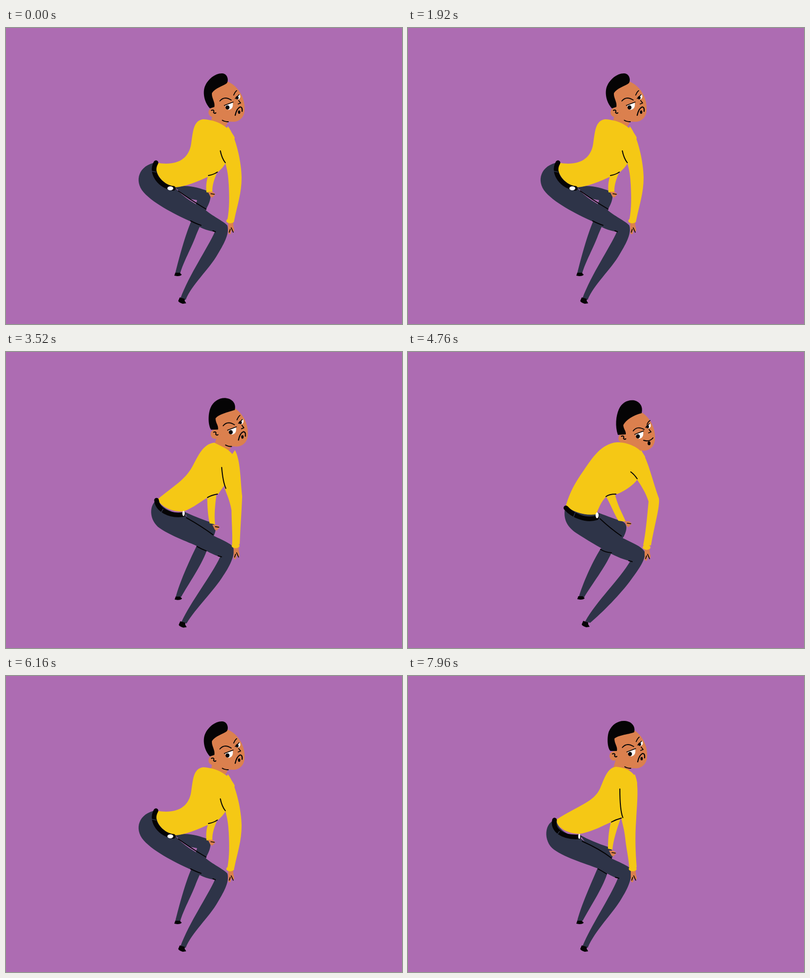
Recreate the animation shown at these times as an HTML page with a canvas. Size 800 px wide and 600 px high, loop 8000 ms.

```html
<!DOCTYPE html>
<html lang="en">
<head>
<meta charset="utf-8">
<title>Dance</title>
<style>
html, body { margin: 0; width: 100%; height: 100%; overflow: hidden; background: #ad6cb2; }
canvas { display: block; }
</style>
</head>
<body>
<canvas id="stage" width="800" height="600"></canvas>
<script>
const ctx = document.getElementById('stage').getContext('2d');
const NAVY = '#2e3448', YELLOW = '#f5c815', SKIN = '#db804e', BLACK = '#050405', WHITE = '#fff';

// Key poses share path commands, so their numbers can be blended.
const hipsBack = {
  hair: 'M412 163C400 150 397 130 402 118C408 103 424 91 437 92C449 93 450 108 446 112C438 118 422 122 416 132C415 142 423 150 421 160Z',
  shirt: 'M398 185C378 188 378 210 374 235C369 268 342 280 304 273C299 295 316 317 341 323C370 321 400 305 427 293C433 288 440 281 444 273C455 255 460 235 462 222C452 200 425 186 398 185Z',
  arm: 'M448 199C465 220 476 275 476 303C476 335 467 360 461 390L447 390C452 365 451 340 450 318C449 295 446 285 443 273L436 235Z',
  farArm: 'M409 298C404 312 404 322 405 333L417 335C416 320 420 308 426 294Z',
  leg: 'M304 272C268 278 258 310 278 333C300 358 350 382 375 393C390 404 405 411 422 413C408 445 370 500 352 549L363 551C375 520 410 490 428 458C442 435 452 415 447 400C440 392 415 380 402 368C380 355 360 345 341 323C316 317 299 295 304 272Z',
  farLeg: 'M341 323C365 316 390 324 406 330C418 334 413 352 405 366C400 385 390 405 384 420C375 445 358 475 352 497L342 497C350 465 362 420 374 392L386 349L370 346Z',
  belt: 'M303 273C290 295 313 322 338 325',
  loop: 'M293 290L303 292',
  seams: 'M433 249Q436 264 443 273M409 299Q420 297 427 292M348 330Q372 348 404 367M373 391Q385 397 394 400M418 411L423 413',
  face: '0 0', ear: '418 171', buckle: '332 325 6 4', hand: '454 407', farHand: '416 337', foot: '356 553', farFoot: '347 500'
};
const upright = {
  hair: 'M409 152C402 145 402 122 406 112C412 98 425 90 438 91C452 92 460 102 457 114C443 119 424 120 417 127C417 138 424 143 422 152Z',
  shirt: 'M420 184C402 186 396 210 388 228C376 255 345 262 300 291C299 305 320 320 347 320C375 315 400 300 411 296C418 292 425 290 431 288C445 260 460 235 463 218C462 198 445 186 420 184Z',
  arm: 'M458 199C467 218 463 255 461 290C458 330 460 360 462 388L447 390C446 370 441 350 439 330C437 310 433 300 431 288L428 240Z',
  farArm: 'M410 296C405 315 404 335 404 350L413 352C414 335 422 310 429 290Z',
  leg: 'M300 291C275 295 272 335 295 352C320 370 365 382 388 392C405 402 415 408 424 410C408 450 370 505 352 549L363 551C378 515 415 480 432 450C448 425 456 400 447 388C440 383 425 376 411 370C390 358 370 345 347 328C325 325 300 310 300 291Z',
  farLeg: 'M347 322C365 332 385 340 403 346C415 350 416 362 411 372C409 385 405 395 402 402C392 432 368 468 353 496L342 496C350 465 368 425 382 392L390 372L375 360Z',
  belt: 'M296 292C291 312 312 328 345 326',
  loop: 'M301 322L306 315',
  seams: 'M428 229Q428 272 434 287M411 296Q420 291 431 288M352 335Q388 351 411 369M384 391Q393 396 401 401M419 408L426 410',
  face: '1 -3', ear: '416 162', buckle: '346 325 2 5', hand: '455 407', farHand: '414 359', foot: '356 553', farFoot: '347 500'
};
const leaning = {
  hair: 'M424 168C418 150 420 130 426 116C432 102 445 96 457 98C470 101 475 112 472 124C455 128 440 138 435 148C435 156 441 160 440 167Z',
  shirt: 'M422 183C390 186 372 215 355 240C335 268 325 290 319 312C335 325 358 332 380 329C385 318 390 302 401 293C410 289 418 289 425 287C440 280 455 270 463 259C473 245 480 235 479 212C468 193 445 183 422 183Z',
  arm: 'M471 199C486 222 492 255 507 297C509 315 498 350 491 392L475 392C480 370 483 335 486 303C480 285 472 272 463 259L450 235Z',
  farArm: 'M400 293C410 310 415 325 425 342L440 344C432 325 423 310 418 288Z',
  leg: 'M318 312C313 335 318 352 340 367C360 380 385 395 405 406C420 415 440 422 449 424C428 460 380 506 358 546L368 549C392 529 432 488 451 461C467 440 482 417 478 405C472 392 440 382 425 372C405 357 395 345 380 328C358 332 335 325 318 312Z',
  farLeg: 'M380 324C395 330 415 337 428 342C444 345 444 358 436 374C428 385 420 395 411 407C398 437 372 470 356 497L345 497C353 470 370 430 389 399L405 385L390 350Z',
  belt: 'M319 316C333 332 360 343 381 336',
  loop: 'M334 335L338 325',
  seams: 'M450 243Q457 248 463 257M400 293Q406 288 420 288M388 338Q408 357 431 373M389 400Q398 406 411 407M446 423L453 425',
  face: '17 10', ear: '434 175', buckle: '382 331 3 6', hand: '483 412', farHand: '445 348', foot: '359 552', farFoot: '349 499'
};
const tucked = {
  hair: 'M440 180C432 165 434 145 440 130C447 115 462 111 474 112C488 114 494 125 488 135C475 146 458 148 450 156C448 165 456 172 454 178Z',
  shirt: 'M440 188C405 188 370 215 350 242C330 270 324 290 322 316C335 330 360 337 382 330C380 312 390 293 408 289C420 288 425 288 432 286C450 282 468 270 473 260C480 250 488 238 487 214C475 200 460 190 440 188Z',
  arm: 'M482 206C492 225 495 250 508 283C515 310 500 350 497 392L481 392C486 365 490 330 490 303C488 285 480 272 470 260L455 235Z',
  farArm: 'M410 289C418 305 424 325 431 342L444 344C438 325 433 310 430 286Z',
  leg: 'M321 316C319 335 325 355 350 372C370 385 395 398 412 407C430 416 445 425 460 426C440 460 383 507 358 546L368 549C395 528 435 492 457 462C473 440 488 420 486 406C478 392 450 382 432 375C410 362 395 345 383 330C360 336 335 330 321 316Z',
  farLeg: 'M383 328C400 334 420 341 435 344C450 346 448 362 434 376C428 390 420 400 415 407C401 437 372 470 356 497L345 497C353 470 370 430 391 400L405 385L392 350Z',
  belt: 'M322 321C335 338 365 345 383 333',
  loop: 'M337 341L341 331',
  seams: 'M457 249Q465 250 469 259M409 289Q420 289 432 285M387 338Q412 357 436 375M393 399Q403 405 414 408M452 424L461 426',
  face: '35 22', ear: '450 186', buckle: '384 329 2 4', hand: '487 414', farHand: '449 348', foot: '359 552', farFoot: '348 500'
};
const poses = [hipsBack, upright, leaning, tucked];

// [step within the 24-step beat, position along the pose chain]
const beat = [[0, 0], [1, .95], [2, 1], [12, 1.35], [13, 2], [17, 3], [19, 3], [21, 1], [22, .95], [23, .12], [24, 0]];

const mix = (a, b, k) => a + (b - a) * k;
const ease = k => k * k * (3 - 2 * k);

function chainPosition(step) {
  const i = beat.findIndex(key => key[0] > step);
  const [t0, p0] = beat[i - 1], [t1, p1] = beat[i];
  return mix(p0, p1, ease((step - t0) / (t1 - t0)));
}

// The dance slows to a stop in the middle, then picks up again.
function beatStep(frame) {
  if (frame < 84) return frame % 24;
  if (frame < 106) return 12 + .3 * ease((frame - 84) / 22);
  if (frame < 110) return 12.3;
  if (frame < 119) return mix(12.3, 13, (frame - 110) / 9);
  return (frame - 106) % 24;
}

function blendPose(position) {
  const i = Math.min(Math.floor(position), poses.length - 2), k = position - i;
  const pose = {};
  for (const part in poses[i]) {
    const next = poses[i + 1][part].match(/-?\d+/g);
    let n = 0;
    pose[part] = poses[i][part].replace(/-?\d+/g, v => mix(+v, +next[n++], k).toFixed(2));
  }
  return pose;
}

function fill(path, color) {
  ctx.fillStyle = color;
  ctx.fill(new Path2D(path));
}

function line(path, width = 2, color = BLACK) {
  ctx.strokeStyle = color;
  ctx.lineWidth = width;
  ctx.stroke(new Path2D(path));
}

function oval(x, y, rx, ry, color) {
  ctx.fillStyle = color;
  ctx.beginPath();
  ctx.ellipse(x, y, rx, ry, 0, 0, 7);
  ctx.fill();
}

function at(place, draw) {
  const [x, y] = place.split(' ');
  ctx.save();
  ctx.translate(+x, +y);
  draw();
  ctx.restore();
}

function drawFeatures(smile, blink) {
  line('M437 187Q442 190 449 190');
  line(smile ? 'M438 150Q446 139 460 147M466 137Q468 131 472 129' : 'M432 148Q441 137 455 146M460 136Q463 129 466 127', 1.8);
  if (!blink) {
    fill('M443 157L458 151Q460 164 450 166Q444 165 443 157Z', WHITE);
    fill('M464 143L472 134Q476 142 469 145Z', WHITE);
    oval(447.5, 161, 4, 4.3, BLACK);
    oval(467, 141.5, 2.8, 3.3, BLACK);
  }
  line('M441 157L459 150M463 143L471 135', 1.6);
  line('M470 147L474 152L469 154', 1.8);
  if (smile) {
    line('M459 169Q471 173 478 164');
    oval(470, 175, 3, 4, BLACK);
  } else {
    line('M463 177Q466 163 473 160Q478 160 477 169', 2.2);
    oval(471, 170.5, 2.4, 3.6, BLACK);
  }
}

function drawHead(pose, smile, blink) {
  at(pose.face, () => {
    fill('M420 168L413 192L444 199L451 185Z', SKIN);
    fill('M414 128L446 108C468 116 483 140 482 165C482 182 470 191 457 190C443 190 430 186 417 173Z', SKIN);
  });
  at(pose.ear, () => oval(0, 0, 9, 9.5, SKIN));
  fill(pose.hair, BLACK);
  at(pose.ear, () => line('M-3 -4Q2 -6 2 -2Q0 1 4 2L6 1'));
  at(pose.face, () => drawFeatures(smile, blink));
}

function drawHand(pose) {
  at(pose.hand, () => {
    fill('M-5 -13L5 -13Q5 -5 7 1Q7 6 5 7L1 3L0 10Q-3 13 -5 8Z', SKIN);
    line('M-1 1L-3 7M1 -2L5 7', 1.7);
  });
}

function drawFigure(pose, smile, blink) {
  fill(pose.farLeg, NAVY);
  at(pose.farFoot, () => fill('M-5 -4L4 -4L8 0Q6 3 -1 3L-7 2Z', BLACK));
  fill(pose.farArm, YELLOW);
  at(pose.farHand, () => {
    fill('M-8 -5L2 -5L7 0L4 3L1 7L-3 5Z', SKIN);
    line('M-2 -1L5 0', 1.7);
  });
  fill(pose.leg, NAVY);
  at(pose.foot, () => fill('M-5 -7L5 -4L5 0L8 5L1 6Q-8 3 -8 0Z', BLACK));
  drawHead(pose, smile, blink);
  fill(pose.shirt, YELLOW);
  line(pose.belt, 9.5);
  line(pose.loop, 1.5, NAVY);
  const [x, y, rx, ry] = pose.buckle.split(' ').map(Number);
  oval(x, y, rx, ry, WHITE);
  drawHand(pose);
  fill(pose.arm, YELLOW);
  at(pose.hand, () => oval(-1, -16, 8, 5, YELLOW));
  line(pose.seams);
}

function render() {
  const frame = Math.floor(performance.now() / 40) % 200;
  ctx.fillStyle = '#ad6cb2';
  ctx.fillRect(0, 0, 800, 600);
  ctx.lineJoin = ctx.lineCap = 'round';
  const smile = frame >= 95 && frame < 152;
  drawFigure(blendPose(chainPosition(beatStep(frame))), smile, frame === 106);
  requestAnimationFrame(render);
}
render();
</script>
</body>
</html>
```
